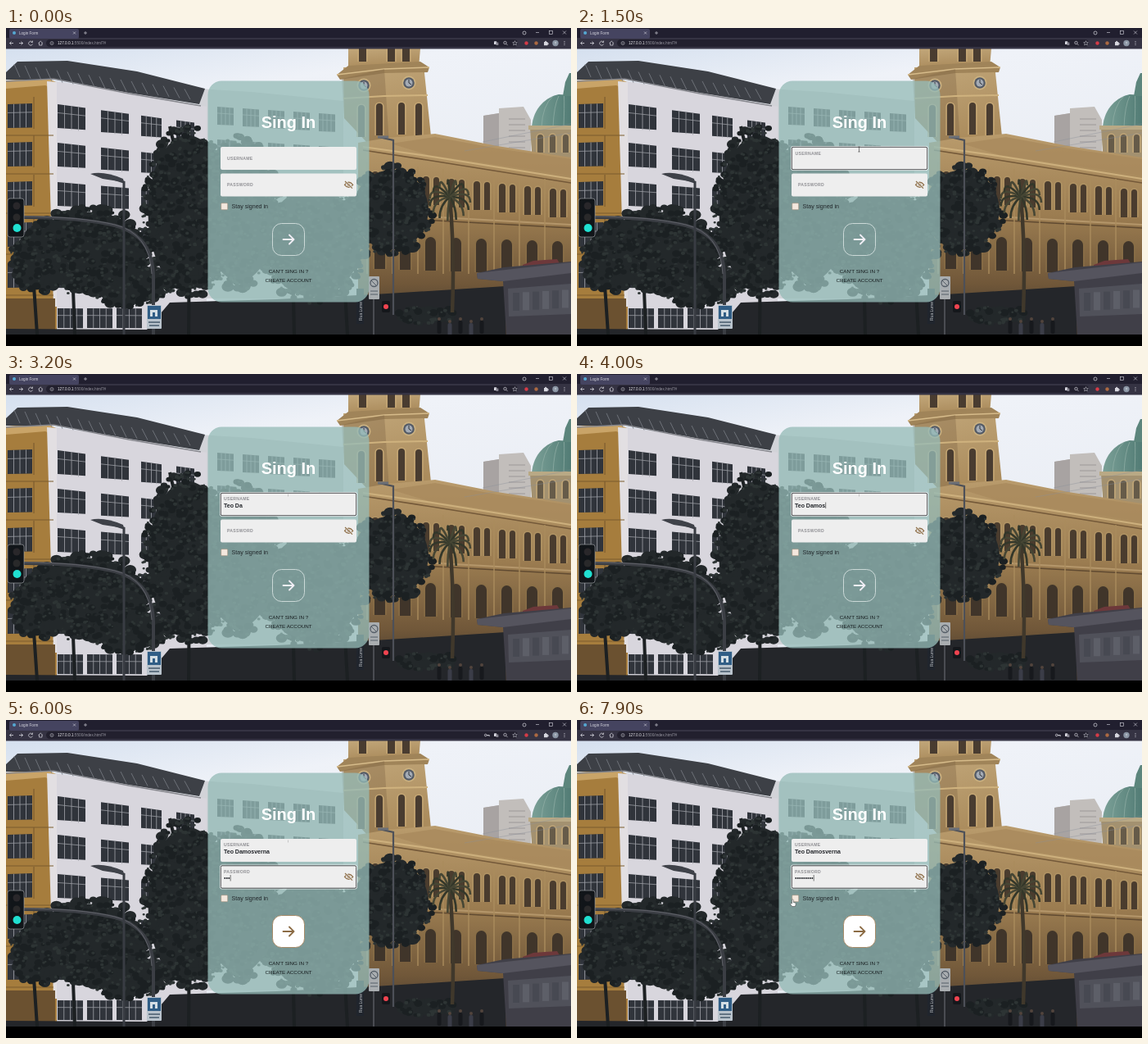
These frames come from a looping animation (690x388 px, 8 s). An HTML page:

```html
<!DOCTYPE html>
<html lang="en">
<head>
<meta charset="utf-8">
<title>Login Form</title>
<style>
html, body { margin: 0; width: 100%; height: 100%; overflow: hidden; background: #000; }
svg { display: block; width: 100vw; height: 100vh; }
text { font-family: "Liberation Sans", Arial, sans-serif; white-space: pre; }
.label { font-size: 5.1px; font-weight: 700; letter-spacing: .3px; fill: #8f8f93; }
.value { font-size: 7px; font-weight: 700; fill: #22252a; }
</style>
</head>
<body>
<svg id="stage" viewBox="0 0 690 388">
  <defs>
    <linearGradient id="sky" x2=".35" y2="1">
      <stop offset="0" stop-color="#d5e0ef"/><stop offset=".25" stop-color="#eff2f8"/><stop offset="1" stop-color="#e6eaf1"/>
    </linearGradient>
    <linearGradient id="tower" x2=".3" y2="1">
      <stop offset="0" stop-color="#c2a77a"/><stop offset="1" stop-color="#ab8c5d"/>
    </linearGradient>
    <linearGradient id="nave" x2="0" y2="1">
      <stop offset="0" stop-color="#b99b6c"/><stop offset=".4" stop-color="#9c7d51"/>
      <stop offset=".75" stop-color="#705739"/><stop offset="1" stop-color="#36302b"/>
    </linearGradient>
    <linearGradient id="dome">
      <stop offset="0" stop-color="#7ba097"/><stop offset="1" stop-color="#527c75"/>
    </linearGradient>
    <clipPath id="photoArea"><path d="M0 25H690V374H0Z"/></clipPath>
  </defs>
  <g id="photo" clip-path="url(#photoArea)"></g>
  <g id="browser"></g>
  <g id="card"></g>
  <g id="pointer"></g>
</svg>
<script>
const LOOP = 8000;
const NS = "http://www.w3.org/2000/svg";
const $ = id => document.getElementById(id);

function add(parent, tag, attrs, content) {
  const node = document.createElementNS(NS, tag);
  for (const key in attrs) node.setAttribute(key, attrs[key]);
  if (content) node.textContent = content;
  return parent.appendChild(node);
}
const shape = (g, d, fill, extra) => add(g, "path", { d, fill, ...extra });
const line = (g, d, stroke, width = 1, extra) =>
  add(g, "path", { d, stroke, "stroke-width": width, fill: "none", ...extra });
const rect = (g, x, y, width, height, fill, extra) =>
  add(g, "rect", { x, y, width, height, fill, ...extra });
const dot = (g, cx, cy, r, fill, extra) => add(g, "circle", { cx, cy, r, fill, ...extra });
const label = (g, x, y, size, fill, content, extra) =>
  add(g, "text", { x, y, "font-size": size, fill, ...extra }, content);

let seed = 11;
const random = () => (seed = seed * 16807 % 2147483647) / 2147483647;

// Leafy blob: a solid core with small clumps scattered over its edge.
function foliage(g, cx, cy, rx, ry) {
  add(g, "ellipse", { cx, cy, rx: rx * .88, ry: ry * .88, fill: "#23282a" });
  const count = rx * ry / 26;
  for (const [tone, size] of [["#23282a", 7], ["#1b2022", 5], ["#2d3434", 2.5]]) {
    let d = "";
    for (let i = 0; i < count; i++) {
      const a = random() * Math.PI * 2, q = Math.sqrt(random());
      const r = size * (.5 + random() * .6);
      const x = cx + Math.cos(a) * q * rx, y = cy + Math.sin(a) * q * ry;
      d += `M${(x - r).toFixed(1)} ${y.toFixed(1)}a${r} ${r * .8} 0 1 0 ${2 * r} 0a${r} ${r * .8} 0 1 0 ${-2 * r} 0`;
    }
    shape(g, d, tone);
  }
}

function paneWindow(g, x, y, w, h, skew) {
  const s = w * skew;
  shape(g, `M${x} ${y}l${w} ${s}v${h - s / 2}l${-w} ${-s / 2}Z`, "#30343b");
  for (let i = 1; i < 4; i++) line(g, `M${x + w * i / 4} ${y + s * i / 4}v${h}`, "#a2a4aa", .8);
  line(g, `M${x} ${y + h * .36}l${w} ${s * .8}`, "#9a9ca3", .8);
}

function archWindow(g, x, y, w, h, fill = "#493c30", trim = "#c8ab78") {
  const r = w / 2;
  line(g, `M${x - 1} ${y + h}V${y + r}a${r + 1} ${r + 1} 0 0 1 ${w + 2} 0V${y + h}`, trim, 1.2);
  shape(g, `M${x} ${y + h}V${y + r}a${r} ${r} 0 0 1 ${w} 0V${y + h}Z`, fill);
}

function drawOffices(g) {
  shape(g, "M236 74L300 78L412 89V330H236Z", "#d2d3d8");
  for (let r = 0; r < 2; r++)
    for (let c = 0; c < 5; c++) paneWindow(g, 258 + c * 31, 96 + r * 40 + c * 2, 20, 22, .08);
  shape(g, "M47 63L150 78L245 96V374H47Z", "#d8d6dd");
  shape(g, "M0 65L49 62L62 90V374H0Z", "#a67d3d");
  shape(g, "M0 64L49 60L61 66V75L48 70L0 74Z", "#c9a468");
  shape(g, "M50 65L62 66V340H58Z", "#e2dfe2");
  shape(g, "M0 63V54L14 41L75 40L160 53L243 74L236 93L150 79L62 63Z", "#3d4046");
  for (let i = 0; i < 17; i++) line(g, `M${10 + i * 13} ${44 + i * 1.9}l7 ${16 - i * .2}`, "#7a7e86", .8);
  line(g, "M0 65L58 62L150 80L238 95", "#85868c", 1.5);
  [93, 140, 188, 238, 288].forEach((y, row) => {
    const slope = .135 - row * .025;
    [[63, 34], [116, 34], [165, 25], [208, 22]].forEach(([x, w]) =>
      paneWindow(g, x, y + (x - 63) * slope, w, 29 - (x - 63) * .04, slope));
    paneWindow(g, 2, y, 30, 29, -.03);
    line(g, `M34 ${y - 9}V${y + 30}M0 ${y + 38}H58`, "#7c5d2f", 1.2);
  });
  shape(g, "M0 330H60V374H0Z", "#6b5130");
}

function drawChurch(g) {
  shape(g, "M583 107L602 104V98L632 96L641 112V162H583Z", "#c2bebb");
  shape(g, "M583 107L602 104V160H583Z", "#a8a3a2");
  for (let y = 111; y < 150; y += 7) line(g, `M614 ${y}H634`, "#a39f9e", 1.2);
  shape(g, "M642 121C644 97 660 84 675 81L690 82V122Z", "url(#dome)");
  [654, 668, 681].forEach(x => line(g, `M${x} 121Q${x + 1} 95 ${x + (682 - x) * .5} 83`, "#94b1a8", .7));
  shape(g, "M680 83L683 66L688 55H690V83Z", "#5c857c");
  shape(g, "M640 121H690V166H643Z", "#a39170");
  rect(g, 638, 119, 52, 5, "#b9a985");
  [649, 664, 680].forEach(x => archWindow(g, x, 130, 7, 22, "#665b49"));

  shape(g, "M418 25H506L504 48H418Z", "url(#tower)");
  [431, 466, 484].forEach(x => archWindow(g, x, 16, 9, 25));
  shape(g, "M412 48L510 45L520 142H443L413 110Z", "url(#tower)");
  shape(g, "M404 57L418 46L506 41L517 48L515 54L462 55L408 63Z", "#a08459");
  line(g, "M404 57L462 50L517 48", "#d6bb8a", 1.5);
  shape(g, "M462 50L468 142H443L413 110L410 62Z", "#7c6342", { opacity: .35 });
  for (const [x, y] of [[437, 70], [492, 67]]) {
    dot(g, x, y, 8.5, "#cbb180");
    dot(g, x, y, 6.8, "#535a66");
    dot(g, x, y, 4.5, "#a4abb5");
    line(g, `M${x} ${y - 4}V${y}L${x + 3} ${y + 2}`, "#30343b", 1);
  }
  line(g, "M412 86L462 83L515 82", "#cfb27e", 2);
  [[430, 94], [452, 92], [479, 91], [500, 92]].forEach(([x, y]) => archWindow(g, x, y, 8, 39));

  shape(g, "M430 140L466 134L524 129L600 144L690 158V374H430Z", "url(#nave)");
  shape(g, "M470 141L524 133L600 147L690 160V180L516 155Z", "#a98a5d", { opacity: .8 });
  line(g, "M436 145L514 156L690 184", "#cdb07d", 2.2);
  line(g, "M436 149L514 161L690 189", "#745939", 1.6);
  line(g, "M436 226L690 240", "#b4966a", 2.2);
  line(g, "M436 230L690 244", "#604a31", 1.6);
  for (let i = 0; i < 8; i++) {
    const x = 447 + i * 31, y = 175 + i * 3;
    archWindow(g, x, y, 8, 35, "#4a3c2e", "#b39767");
    archWindow(g, x + 13, y + 1, 7, 34, "#4a3c2e", "#b39767");
    archWindow(g, x + 3, 253 + i, 13, 41, "#40352a", "#8a7048");
    line(g, `M${x - 6} ${y - 12}V300`, "#a98b5c", 2, { opacity: .7 });
  }
  line(g, "M582 139L690 117M560 150L690 128", "#8a8f97", .4);
}

function drawStreet(g) {
  shape(g, "M0 367L172 368L200 335L330 331L450 325L610 315V374H0Z", "#24262a");
  for (let i = 0; i < 3; i++) paneWindow(g, 63 + i * 36, 342, 31, 24, .01);
  line(g, "M200 120C220 200 225 260 223 374M80 265L84 374M32 285L38 374M350 285L352 374M410 250L417 374", "#1c2022", 4);
  foliage(g, 100, 272, 80, 54);
  foliage(g, 38, 284, 34, 40);
  foliage(g, 222, 225, 55, 107);
  foliage(g, 150, 312, 50, 28);
  foliage(g, 285, 225, 50, 95);
  foliage(g, 375, 262, 66, 75);
  foliage(g, 470, 222, 52, 55);
  foliage(g, 515, 350, 36, 11);

  line(g, "M542 206Q548 275 545 347", "#40382b", 4.5);
  for (let i = 0; i < 15; i++) {
    const a = i * Math.PI * 2 / 15, x = 542 + Math.cos(a) * 25, y = 207 + Math.sin(a) * 22;
    line(g, `M542 206Q${x} ${y - 10} ${x} ${y + 6}`, i % 2 ? "#33372a" : "#464634", 2.6);
  }
  line(g, "M455 133L473 137V350", "#4d5058", 2.2);
  line(g, "M454 133H467", "#6b6f77", 3);
  shape(g, "M631 289L644 284L673 282L679 292H631Z", "#6d383a");
  shape(g, "M575 299L608 292L690 285V374H611L607 309L576 306Z", "#403f48");
  shape(g, "M575 299L690 286V299L607 309L576 306Z", "#55545e");
  shape(g, "M613 318L690 312V349L614 352Z", "#50515a");
  for (let i = 0; i < 6; i++) rect(g, 619 + i * 12, 323 - i * .7, 8, 22, i % 2 ? "#5d5f68" : "#474952");
  for (let i = 0; i < 5; i++) {
    const x = 529 + i * 13, y = 355 + i % 2 * 3;
    dot(g, x, y, 2, "#52443d");
    rect(g, x - 2.5, y + 2, 5, 16, i % 2 ? "#3b3d48" : "#17191d", { rx: 2 });
  }

  line(g, "M22 231Q91 231 133 241Q179 253 180 302V374", "#3b3e44", 4);
  line(g, "M22 230Q91 230 133 240Q175 250 178 300", "#6b6d74", .8);
  rect(g, 2, 208, 20, 47, "#111519", { rx: 3, stroke: "#a9acb0", "stroke-width": .6 });
  dot(g, 13, 217, 4.5, "#29272a");
  dot(g, 13, 231, 4.5, "#29292a");
  dot(g, 13.5, 244, 5, "#20e0d1");
  line(g, "M144 374V188L119 180", "#393c43", 3);
  shape(g, "M103 178Q119 174 143 184L144 188L118 184Z", "#3f4249");
  rect(g, 172, 338, 18, 29, "#b9c3cc", { rx: 1 });
  rect(g, 173, 339, 16, 16, "#315e86");
  shape(g, "M176 352V344H185V352H182V347H179V352Z", "#d4dee4");
  line(g, "M174 359H188M175 363H187", "#46596b", 1.3);
  line(g, "M449 304V374", "#575a60", 1.5);
  rect(g, 443, 303, 13, 28, "#a9adb0", { rx: 1 });
  dot(g, 449.5, 311, 4.5, "none", { stroke: "#555e68", "stroke-width": 1.3 });
  line(g, "M446 308L453 315M445 321H454M445 325H454", "#555e68", 1);
  rect(g, 428, 318, 9, 43, "#20252d");
  label(g, 0, 0, 5, "#c3c7cb", "Rua Lume", { transform: "translate(434.5 357) rotate(-90)" });
  rect(g, 459, 333, 10, 14, "#15171b", { rx: 2 });
  dot(g, 464, 340, 3, "#f04450");
}

function drawPhoto() {
  const g = $("photo");
  rect(g, 0, 25, 690, 349, "url(#sky)");
  drawOffices(g);
  drawChurch(g);
  drawStreet(g);
}

function drawBrowser() {
  const g = $("browser"), ink = "#d7d7df";
  rect(g, 0, 0, 690, 13, "#211f2f");
  rect(g, 0, 12, 690, 13.5, "#353343");
  rect(g, 4, 1, 85, 12, "#454460", { rx: 2 });
  dot(g, 10, 6, 2, "#55a9d3");
  label(g, 16, 7.8, 4.6, ink, "Login Form");
  line(g, "M82 4.5l3 3m0-3l-3 3M95 6h4m-2-2v4M647 5.5h4M680 3.5l4 4m0-4l-4 4", ink, .6);
  rect(g, 663.5, 3.5, 4, 4, "none", { stroke: ink, "stroke-width": .6 });
  dot(g, 633, 6, 2, "none", { stroke: ink, "stroke-width": .7 });
  line(g, "M9 18.5H4.5M6.5 16.5l-2 2 2 2M16 18.5h4.5M18.5 16.5l2 2-2 2", ink, .8);
  line(g, "M32 17a2.5 2.5 0 1 0 .5 2.5M32.5 15.5v2h-2M39.5 18.5l2.7-2.5 2.7 2.5M40.5 18v3h3.5v-3", ink, .7);
  rect(g, 49, 14, 576, 9, "#22202e", { rx: 4.5 });
  dot(g, 56, 18.5, 2, "none", { stroke: ink, "stroke-width": .5 });
  line(g, "M56 18v1.6M56 17v.4", ink, .5);
  const url = label(g, 63, 20.2, 4.7, "#f0f0f3", "");
  add(url, "tspan", {}, "127.0.0.1");
  add(url, "tspan", { fill: "#96959f" }, ":5500/index.html?#");
  rect(g, 596, 16.3, 3.2, 3.8, ink, { rx: .5 });
  rect(g, 598.4, 17.5, 3, 3.5, "#85838f", { rx: .5 });
  dot(g, 609.5, 18, 1.7, "none", { stroke: ink, "stroke-width": .7 });
  line(g, "M610.8 19.3l1.8 1.8", ink, .7);
  shape(g, "M621.5 15.7l.8 1.9 2 .1-1.5 1.3.5 2-1.8-1.1-1.8 1.1.5-2-1.5-1.3 2-.1Z", "none", { stroke: ink, "stroke-width": .5 });
  dot(g, 635.5, 18.5, 2.2, "#d63b47");
  dot(g, 647.5, 18.5, 2.2, "#ad6942");
  shape(g, "M657 17h1.3a.9.9 0 1 1 1.7 0h1.5v1.4a.9.9 0 1 1 0 1.7v1.2H657Z", ink);
  dot(g, 671, 18.5, 3.7, "#8b96a5");
  label(g, 671, 20, 4.2, "#fff", "T", { "text-anchor": "middle" });
  [16.5, 18.5, 20.5].forEach(y => dot(g, 682, y, .6, ink));
  const key = add(g, "g", {});
  dot(key, 585.7, 18.5, 1.3, "none", { stroke: ink, "stroke-width": .8 });
  line(key, "M587 18.5h3.3v1.6M588.7 18.5v1.2", ink, .8);
  return key;
}

function makeField(g, y, name) {
  rect(g, 262, y, 166, 28, "#eee", { rx: 2 });
  const ring = add(g, "g", {});
  rect(ring, 261.5, y - .5, 167, 29, "none", { rx: 2, stroke: "#fff", "stroke-width": .8 });
  rect(ring, 262.3, y + .3, 165.4, 27.4, "none", { rx: 1.7, stroke: "#26282b", "stroke-width": .8 });
  const title = add(g, "text", { class: "label" }, name);
  const value = add(g, "text", { class: "value", x: 266, y: y + 18 });
  const bullets = add(g, "g", {});
  const caret = rect(g, 0, y + 11.5, .6, 7.5, "#222");
  return { y, ring, title, value, bullets, caret };
}

function drawCard() {
  const g = $("card"), centre = { "text-anchor": "middle" };
  rect(g, 246.5, 64.5, 197, 270, "#96bcb8", { rx: 17, opacity: .77 });
  label(g, 345, 121.5, 20, "#fff", "Sing In", { ...centre, "font-weight": 700 });
  const user = makeField(g, 145, "USERNAME");
  const pass = makeField(g, 177.5, "PASSWORD");
  for (let i = 0; i < 9; i++) dot(pass.bullets, 267.3 + i * 2.5, 193, 1, "#22252a");
  line(g, "M413.5 191.3Q418.5 185 423.7 191.3Q418.5 197.5 413.5 191.3Z", "#8c6c45", 1.2);
  dot(g, 418.6, 191.3, 1.8, "#8c6c45");
  line(g, "M414.2 187l9 8.7", "#eee", 2.4);
  line(g, "M414 187l9 8.7", "#8c6c45", 1.1);
  rect(g, 262.7, 213.7, 8, 8, "#f4e8de", { rx: 1, stroke: "#a08c77", "stroke-width": .6 });
  label(g, 275.5, 220.3, 7.1, "#22282b", "Stay signed in");
  const button = rect(g, 325.5, 238.5, 39, 39, "none", { rx: 11, "stroke-width": .8 });
  const arrow = line(g, "M338.5 258H351.5M346 252.5L351.5 258L346 263.5", "#fff", 1.8,
    { "stroke-linecap": "round", "stroke-linejoin": "round" });
  label(g, 345, 299, 6.25, "#171d1f", "CAN'T SING IN ?", centre);
  label(g, 345, 310, 6.25, "#171d1f", "CREATE ACCOUNT", centre);
  return { user, pass, button, arrow };
}

function drawPointer() {
  const g = $("pointer");
  const beam = line(g, "", "#333", .6);
  const hand = shape(g, "M-1-4Q0-5 .8-4V-1L3-.4Q4 0 3.7 1.5L3 4H-.8L-3 1Q-3-.5-1 .5Z", "#fff", { stroke: "#333", "stroke-width": .5 });
  return { g, beam, hand };
}

drawPhoto();
const keyIcon = drawBrowser();
const { user, pass, button, arrow } = drawCard();
const pointer = drawPointer();

const NAME = "Teo Damosverna";
const NAME_TYPING = { focus: 1350, first: 1780, step: 255, count: NAME.length };
const PASS_TYPING = { focus: 5330, first: 5500, step: 215, count: 9 };

const show = (node, on) => node.setAttribute("visibility", on ? "visible" : "hidden");
const ease = (t, from, to) => {
  const p = Math.min(1, Math.max(0, (t - from) / (to - from)));
  return p * p * (3 - 2 * p);
};
const mix = (a, b, p) => a + (b - a) * p;
const typed = (t, { first, step, count }) =>
  Math.max(0, Math.min(count, Math.floor((t - first) / step) + 1));

function updateField(field, t, start, end, width) {
  const focused = t >= start && t < end;
  const lift = ease(t, start, start + 200);
  field.title.setAttribute("x", mix(270, 266, lift));
  field.title.setAttribute("y", field.y + mix(15.8, 9.3, lift));
  show(field.ring, focused);
  show(field.caret, focused && (t + 350) % 1000 < 500);
  field.caret.setAttribute("x", 266.3 + width);
}

function updatePointer(t) {
  const enter = ease(t, 300, 750), settle = ease(t, 900, 1350), leave = ease(t, 7300, 7850);
  const x = mix(mix(mix(372, 325, enter), 344.5, settle), 263.5, leave);
  const y = mix(mix(mix(188, 158, enter), 148, settle), 223.5, leave);
  const parked = t > NAME_TYPING.first && t < 7300;
  pointer.g.setAttribute("transform", `translate(${x} ${y})`);
  show(pointer.beam, t >= 300 && t < 7600);
  show(pointer.hand, t >= 7600);
  pointer.beam.setAttribute("opacity", parked ? .35 : 1);
  pointer.beam.setAttribute("d", parked ? "M0-1.5V1.5" : "M-1.2-3H1.2M0-3V3M-1.2 3H1.2");
}

function render(t) {
  const letters = typed(t, NAME_TYPING), bullets = typed(t, PASS_TYPING);
  user.value.textContent = NAME.slice(0, letters);
  [...pass.bullets.children].forEach((b, i) => show(b, i < bullets));
  updateField(user, t, NAME_TYPING.focus, PASS_TYPING.focus, letters ? user.value.getComputedTextLength() : 0);
  updateField(pass, t, PASS_TYPING.focus, LOOP, bullets * 2.5);

  const ready = bullets > 0;
  button.setAttribute("fill", ready ? "#fff" : "none");
  button.setAttribute("stroke", ready ? "#a17a50" : "#dfe9e8");
  arrow.setAttribute("stroke", ready ? "#8c6c45" : "#f1eef5");
  show(keyIcon, ready);
  updatePointer(t);
}

const begin = performance.now();
function tick() {
  render((performance.now() - begin) % LOOP);
  requestAnimationFrame(tick);
}
tick();
</script>
</body>
</html>
```
